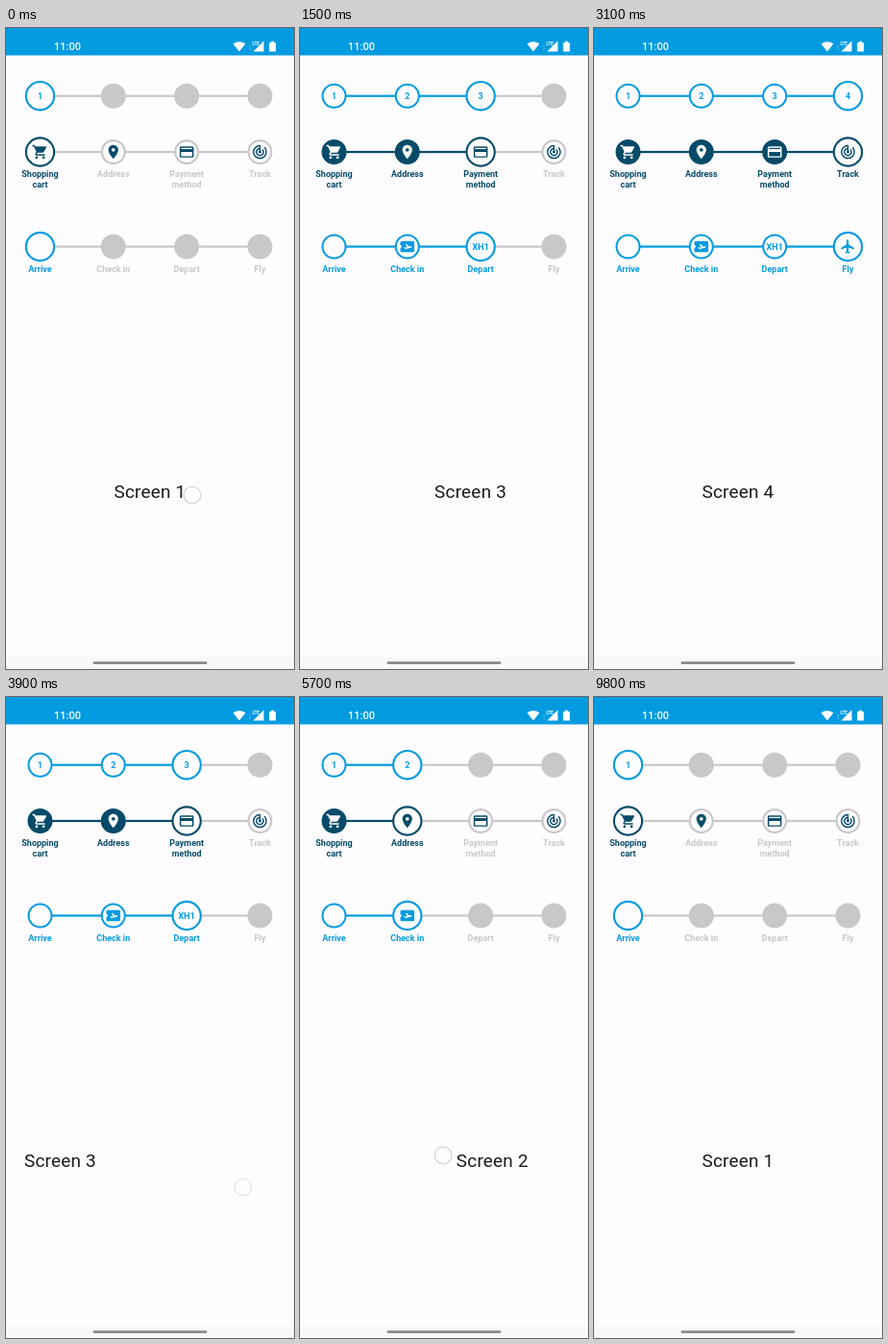
Recreate the animation shown at these times as an HTML page with a canvas. Size 300 px wide and 667 px high, loop 10 s.

```html
<!DOCTYPE html>
<html lang="en">
<head>
<meta charset="utf-8">
<title>Steppers</title>
<style>
  html, body { margin: 0; width: 100%; height: 100%; overflow: hidden; background: #fdfcff; }
  canvas { display: block; width: 300px; height: 667px; }
</style>
</head>
<body>
<canvas width="300" height="667"></canvas>
<script>
const canvas = document.querySelector('canvas');
const ctx = canvas.getContext('2d');
const ratio = window.devicePixelRatio || 1;
canvas.width = 300 * ratio;
canvas.height = 667 * ratio;

const LOOP = 10000, PAGE = 300, HALF = PAGE / 2;
const BLUE = '#039be0', DARK = '#064b69', GREY = '#cac7ca', PAPER = '#fdfdff';
const STEP_X = [35.5, 111.8, 188.2, 264.5];

const icons = {
  cart: 'M7 18c-1.1 0-1.99.9-1.99 2S5.9 22 7 22s2-.9 2-2-.9-2-2-2zM1 2v2h2l3.6 7.59-1.35 2.45c-.16.28-.25.61-.25.96 0 1.1.9 2 2 2h12v-2H7.42c-.14 0-.25-.11-.25-.25l.03-.12.9-1.63h7.45c.75 0 1.41-.41 1.75-1.03l3.58-6.49c.08-.14.12-.31.12-.48 0-.55-.45-1-1-1H5.21l-.94-2H1zm16 16c-1.1 0-1.99.9-1.99 2s.89 2 1.99 2 2-.9 2-2-.9-2-2-2z',
  pin: 'M12 2C8.13 2 5 5.13 5 9c0 5.25 7 13 7 13s7-7.75 7-13c0-3.87-3.13-7-7-7zm0 9.5c-1.38 0-2.5-1.12-2.5-2.5s1.12-2.5 2.5-2.5 2.5 1.12 2.5 2.5-1.12 2.5-2.5 2.5z',
  card: 'M20 4H4c-1.11 0-2 .89-2 2v12c0 1.11.89 2 2 2h16c1.11 0 2-.89 2-2V6c0-1.11-.89-2-2-2zm0 14H4v-6h16v6zm0-10H4V6h16v2z',
  track: 'M19.07 4.93l-1.41 1.41C19.1 7.79 20 9.79 20 12c0 4.42-3.58 8-8 8s-8-3.58-8-8c0-4.08 3.05-7.44 7-7.93v2.02C8.16 6.57 6 9.03 6 12c0 3.31 2.69 6 6 6s6-2.69 6-6c0-1.66-.67-3.16-1.76-4.24l-1.41 1.41C15.55 9.9 16 10.9 16 12c0 2.21-1.79 4-4 4s-4-1.79-4-4c0-1.86 1.28-3.41 3-3.86v2.14c-.6.35-1 .98-1 1.72 0 1.1.9 2 2 2s2-.9 2-2c0-.74-.4-1.38-1-1.72V2h-1C6.48 2 2 6.48 2 12s4.48 10 10 10 10-4.48 10-10c0-2.76-1.12-5.26-2.93-7.07z',
  ticket: 'M20.19 4H4c-1.1 0-2 .9-2 2v4c1.1 0 2 .9 2 2s-.9 2-2 2v4c0 1.1.9 2 2 2h16.19c1 0 1.81-.9 1.81-2V6c0-1.1-.81-2-1.81-2zM17.73 13.3l-8.86 2.36-1.66-2.88.93-.25 1.26.99 2.39-.64-2.4-4.16 1.4-.38 4.01 3.74 2.44-.65c.51-.14 1.04.17 1.18.68.13.51-.17 1.04-.69 1.19z',
  plane: 'M21 16v-2l-8-5V3.5c0-.83-.67-1.5-1.5-1.5S10 2.67 10 3.5V9l-8 5v2l8-2.5V19l-2 1.5V22l3.5-1 3.5 1v-1.5L13 19v-5.5l8 2.5z'
};
for (const name in icons) icons[name] = new Path2D(icons[name]);

// hollow: reached steps stay white; outline: unreached steps show their content
const rows = [
  { y: 70.7, color: BLUE, hollow: true, steps: ['1', '2', '3', '4'], labels: [] },
  { y: 129, color: DARK, outline: true, steps: ['cart', 'pin', 'card', 'track'],
    labels: ['Shopping\ncart', 'Address', 'Payment\nmethod', 'Track'] },
  { y: 227.5, color: BLUE, hollow: true, steps: ['', 'ticket', 'XH1', 'plane'],
    labels: ['Arrive', 'Check in', 'Depart', 'Fly'] }
];

// release: moment the finger lifts; dir +1 goes to the next page
const swipes = [
  { release: 300, dir: 1, x: 194, y: 486 },
  { release: 1350, dir: 1, x: 211, y: 494 },
  { release: 2400, dir: 1, x: 184, y: 493 },
  { release: 3850, dir: -1, x: 89, y: 510 },
  { release: 4700, dir: -1, x: 90, y: 490 },
  { release: 5800, dir: -1, x: 91, y: 477 }
];

const clamp = v => Math.min(1, Math.max(0, v));
const dragged = since => HALF * clamp(since / 200 + 1) ** 1.6;
const settled = since => HALF * (1 - (1 - clamp(since / 350)) ** 3);

function text(str, x, y, font, color, align = 'center', spacing = 0) {
  ctx.font = font + ' Roboto, sans-serif';
  ctx.letterSpacing = spacing + 'px';
  ctx.textAlign = align;
  ctx.fillStyle = color;
  ctx.fillText(str, x, y);
}

function disc(x, y, r, fill, stroke, width = 2) {
  ctx.beginPath();
  ctx.arc(x, y, stroke ? r - width / 2 : r, 0, 2 * Math.PI);
  ctx.fillStyle = fill;
  ctx.fill();
  if (!stroke) return;
  ctx.strokeStyle = stroke;
  ctx.lineWidth = width;
  ctx.stroke();
}

function shape(path, color) {
  ctx.fillStyle = color;
  ctx.fill(new Path2D(path), 'evenodd');
}

function icon(name, x, y, color) {
  const size = 17.5;
  ctx.save();
  ctx.translate(x - size / 2, y - size / 2);
  ctx.scale(size / 24, size / 24);
  ctx.fillStyle = color;
  ctx.fill(icons[name], 'evenodd');
  ctx.restore();
}

function statusBar() {
  ctx.fillStyle = BLUE;
  ctx.fillRect(0, 0, 300, 28.5);
  text('11:00', 50, 23, '500 11px', '#fff', 'left');
  shape('M236.6 16.6Q243 11.8 249.4 16.6L243 24.4Z', '#fff');
  shape('M257.5 24.4L268.5 13.6V24.4Z', '#fff');
  text('LTE', 256.5, 18, '700 4.5px', '#fff', 'left');
  shape('M253.6 18.5h1v1.5h-1zM253.6 21.5h1v1.5h-1z', '#7fcbef');
  shape('M274.2 15.2h2v-1.4h2.8v1.4h2v9.4h-6.8z', '#fff');
}

function stepper(row, active) {
  const { y, color } = row;
  STEP_X.slice(1).forEach((x, i) => {
    ctx.fillStyle = i < active ? color : GREY;
    ctx.fillRect(STEP_X[i], y - 1.1, x - STEP_X[i], 2.2);
  });
  STEP_X.forEach((x, i) => {
    const reached = i <= active;
    let ink = color;
    if (i === active) {
      disc(x, y, 15.7, PAPER, color, 2.1);
    } else if (reached) {
      disc(x, y, 13, row.hollow ? PAPER : color, color);
      if (!row.hollow) ink = '#fff';
    } else if (row.outline) {
      disc(x, y, 13, PAPER, GREY, 2.2);
    } else {
      disc(x, y, 13, GREY);
    }
    const content = row.steps[i];
    if (reached || row.outline) {
      if (icons[content]) icon(content, x, y, ink);
      else text(content, x, y + 3.3, '700 9px', ink);
    }
    (row.labels[i] || '').split('\n').forEach((line, n) =>
      text(line, x, y + 26.2 + n * 10.4, '700 9px', reached ? color : GREY));
  });
}

function touch(swipe, time) {
  const since = time - swipe.release;
  if (since < -350 || since > 125) return;
  const drag = dragged(since);
  const x = swipe.x - swipe.dir * (drag + 8 * clamp(drag / 46));
  ctx.globalAlpha = since > 0 ? 1 - since / 125 : clamp((since + 370) / 60);
  disc(x, swipe.y, 9.5, 'rgba(255,255,255,.45)', '#d6d6d8', 1.3);
  ctx.globalAlpha = 1;
}

function draw(time) {
  ctx.setTransform(ratio, 0, 0, ratio, 0, 0);
  ctx.fillStyle = '#fdfcff';
  ctx.fillRect(0, 0, 300, 667);
  statusBar();

  let scroll = 0, active = 0;
  for (const { release, dir } of swipes) {
    const since = time - release;
    scroll += dir * (dragged(since) + settled(since));
    if (since >= 0) active += dir;
  }
  rows.forEach(row => stepper(row, active));
  for (let page = 0; page < 4; page++) {
    text('Screen ' + (page + 1), 150 + page * PAGE - scroll, 489.3, '400 19px', '#1b1b1e', 'center', 0.18);
  }
  swipes.forEach(swipe => touch(swipe, time));

  ctx.fillStyle = '#faf8fa';
  ctx.fillRect(0, 654.5, 300, 12.5);
  ctx.fillStyle = '#8c8a8c';
  ctx.beginPath();
  ctx.roundRect(90.5, 659.2, 119, 2.8, 1.4);
  ctx.fill();
}

const start = performance.now();
function tick() {
  draw((performance.now() - start) % LOOP);
  requestAnimationFrame(tick);
}
tick();
</script>
</body>
</html>
```
